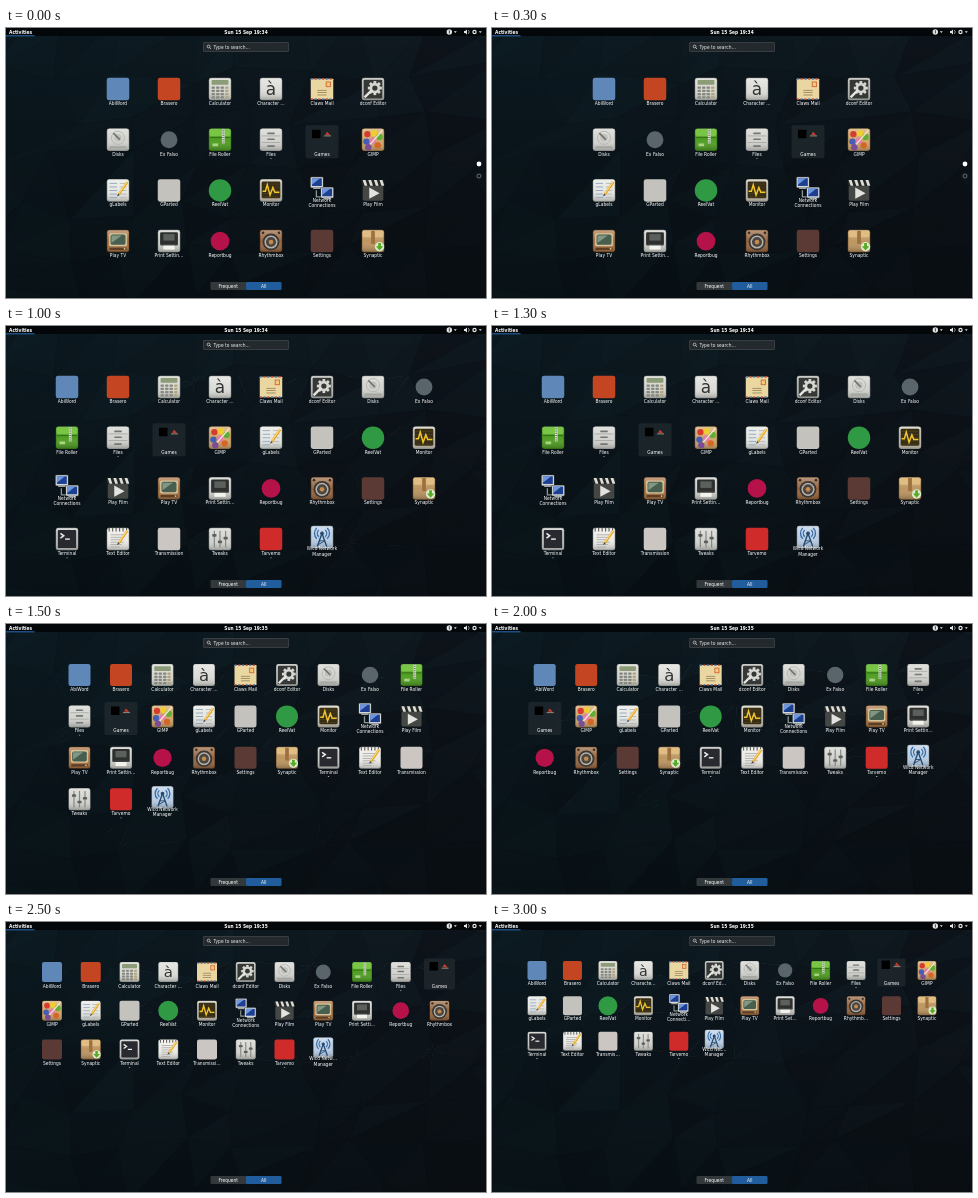
These frames come from a looping animation (480 by 270 pixels, 3.5 s). An HTML page with a canvas:

```html
<!DOCTYPE html>
<html lang="en">
<head>
<meta charset="utf-8">
<title>Application grid</title>
<style>
  html, body { margin: 0; width: 100%; height: 100%; overflow: hidden; background: #0c161b; }
  canvas { display: block; width: 480px; height: 270px; }
</style>
</head>
<body>
<canvas id="stage"></canvas>
<script>
const canvas = document.getElementById('stage');
const ctx = canvas.getContext('2d');
const ratio = window.devicePixelRatio || 1;
canvas.width = 480 * ratio;
canvas.height = 270 * ratio;

const TYPE = '"DejaVu Sans", sans-serif';
const STEP = 500;

// Grid poses: columns, first column, column pitch, first row, row pitch,
// icon size, label offset, label width limit.
const roomy = { pitchX: 51, y: 61, pitchY: 50.7, size: 22.5, label: 14.2, limit: 29.4, folder: 33 };
const medium = { pitchX: 41.5, y: 51, pitchY: 41.4, size: 22, label: 14.2, limit: 29.4, folder: 33 };
const poses = [
  { ...roomy, cols: 6, x: 112, rows: 4, pages: true },
  { ...roomy, cols: 7, x: 86.5, rows: 4, pages: true },
  { ...roomy, cols: 8, x: 61, rows: 4 },
  { ...medium, cols: 9, x: 73.5, rows: 4 },
  { ...medium, cols: 10, x: 52.7, rows: 3 },
  { cols: 11, x: 46, rows: 3, pitchX: 38.75, y: 50, pitchY: 38.7, size: 20, label: 13.8, limit: 28.1, folder: 31 },
  { cols: 12, x: 45, rows: 3, pitchX: 35.45, y: 48.4, pitchY: 35.4, size: 19, label: 12.8, limit: 24.6, folder: 28 }
];

// Drawing helpers
function box(color, x, y, w, h, r = 0) {
  ctx.fillStyle = color;
  ctx.beginPath();
  ctx.roundRect(x, y, w, h, r);
  ctx.fill();
}
function disc(color, x, y, r) {
  ctx.fillStyle = color;
  ctx.beginPath();
  ctx.arc(x, y, r, 0, 7);
  ctx.fill();
}
function ring(color, width, x, y, r, from = 0, to = 2 * Math.PI) {
  ctx.strokeStyle = color;
  ctx.lineWidth = width;
  ctx.beginPath();
  ctx.arc(x, y, r, from, to);
  ctx.stroke();
}
function trace(pts) {
  ctx.beginPath();
  for (let i = 0; i < pts.length; i += 2) ctx.lineTo(pts[i], pts[i + 1]);
}
function poly(color, ...pts) {
  ctx.fillStyle = color;
  trace(pts);
  ctx.fill();
}
function line(color, width, ...pts) {
  ctx.strokeStyle = color;
  ctx.lineWidth = width;
  trace(pts);
  ctx.stroke();
}
// Text is laid out at ten times its size so that spacing stays fractional.
function text(str, x, y, { size = 4.4, weight = '', align = 'center', color = '#fff' } = {}) {
  ctx.save();
  ctx.translate(x, y);
  ctx.scale(0.1, 0.1);
  ctx.font = `${weight} ${size * 10}px ${TYPE}`;
  ctx.textAlign = align;
  ctx.textBaseline = 'alphabetic';
  ctx.fillStyle = color;
  ctx.fillText(str, 0, 0);
  ctx.restore();
}
function elide(str, limit) {
  ctx.font = `44px ${TYPE}`;
  const fits = s => ctx.measureText(s).width <= limit * 10;
  if (fits(str)) return str;
  while (str && !fits(str + '…')) str = str.slice(0, -1);
  return str + '…';
}

// Icons live in a box from -12 to 12.
function tile(color, edge = '#8a8c88') {
  const gloss = ctx.createLinearGradient(0, -12, 0, 12);
  gloss.addColorStop(0, '#fff5');
  gloss.addColorStop(0.5, '#fff0');
  gloss.addColorStop(1, '#0004');
  box(edge, -12, -12, 24, 24, 2.5);
  box(color, -11.4, -11.6, 22.8, 22.8, 2.2);
  box(gloss, -11.4, -11.6, 22.8, 22.8, 2.2);
}
const square = color => () => box(color, -12, -12, 24, 24, 2.5);
const circle = (color, r = 12) => () => disc(color, 0, 0, r);
function pencil() {
  line('#e8a720', 2.6, 10, -9, 1, 4);
  line('#fff3c0', 0.8, 10, -9.6, 1, 3.2);
  poly('#444', 1.9, 5, 0.1, 3.4, -1, 6.4);
}
function screen(x, y) {
  box('#444a4a', x - 0.5, y - 0.5, 14, 12, 1);
  box('#d5d8d8', x, y, 13, 11, 1);
  box('#1c3f91', x + 1.2, y + 1.2, 10.6, 8.2);
  poly('#6e96dc', x + 1.2, y + 1.2, x + 10, y + 1.2, x + 1.2, y + 8);
  box('#a4a9a8', x + 2.5, y + 11, 8, 1.6);
}

const icons = {
  calculator() {
    tile('#d6d6ce');
    box('#8c9c78', -9, -9.5, 18, 5, 0.8);
    for (let i = 0; i < 16; i++)
      box(i % 4 == 3 ? '#b0a57e' : '#858880', -9 + i % 4 * 4.8, -2.6 + (i >> 2) * 3.4, 3.6, 2.4, 0.5);
  },
  characters() {
    tile('#dcddd8');
    text('à', 0, 6.5, { size: 18, color: '#333' });
  },
  mail() {
    box('#e9d6a1', -12, -11, 24, 22, 0.5);
    for (let i = 0; i < 6; i++) {
      box(i % 2 ? '#c75536' : '#557aab', -12 + i * 4, -11.5, 2.5, 1.6);
      box(i % 2 ? '#557aab' : '#c75536', -12 + i * 4, 10, 2.5, 1.6);
    }
    box('#cf6b3b', 4, -8, 5.5, 6);
    box('#f7c77b', 5, -7, 3.5, 4);
    for (let i = 0; i < 3; i++) box('#8d7953', -5, 1 + i * 2.5, 10, 0.8);
  },
  gear() {
    tile('#c6c8c2');
    box('#353836', -10, -10, 20, 20, 1);
    for (let i = 0; i < 8; i++) {
      const a = i * Math.PI / 4;
      line('#d5d6d0', 3, 2, -1, 2 + 7.5 * Math.cos(a), -1 + 7.5 * Math.sin(a));
    }
    disc('#d5d6d0', 2, -1, 5.6);
    disc('#353836', 2, -1, 2.8);
    line('#e3e4df', 2.6, -9, 9, -1, 1);
  },
  drive() {
    tile('#d2d3ce');
    ring('#b4b6b1', 1, 0, -2, 7);
    disc('#bfc1bc', 0, -2, 4);
    line('#71746f', 1.8, -5, -7, 2, 0);
    box('#a3a6a1', -9, 7, 18, 2.2, 0.8);
  },
  archive() {
    tile('#4f9e22', '#2f6913');
    box('#79c544', -11, -11, 22, 7, 1.5);
    box('#347612', -11, -3, 22, 1.4);
    box('#d4dccb', 2, -11, 3, 15);
    for (let i = 0; i < 6; i++) box('#66705c', 2.5, -10 + i * 2.4, 2, 1);
    box('#a8d480', -8, 4, 6, 3);
  },
  files() {
    tile('#d2d3ce');
    for (const y of [-4, 3]) line('#9fa19d', 0.8, -10, y, 10, y);
    box('#747773', -4, -7.6, 8, 1.8, 0.6);
    box('#747773', -4, -1.4, 8, 1.8, 0.6);
    box('#747773', -4, 6, 8, 1.8, 0.6);
  },
  palette() {
    tile('#cfa56a', '#83643b');
    [['#d63b2d', -6, -6], ['#efcc2f', 1, -7], ['#5fae3a', 7, -3], ['#455db5', -7, 2],
     ['#e47cac', 0, 1], ['#d66625', 5, 6], ['#7b4d97', -5, 8]].forEach(([c, x, y]) => disc(c, x, y, 3.4));
    line('#f4ead0', 1.4, 10, -10, -3, 5);
  },
  labels() {
    tile('#e6e6e1');
    for (let i = 0; i < 5; i++) {
      box('#90a8c4', -9, -8 + i * 3.8, 8, 1);
      box('#b8b8b5', 2, -8 + i * 3.8, 7, 1);
    }
    pencil();
  },
  monitor() {
    tile('#d0c9b8');
    box('#352d16', -10, -9.5, 20, 18, 1.5);
    for (let i = -2; i < 3; i++) line('#675623', 0.4, -9, i * 3.4, 9, i * 3.4);
    line('#f3c52c', 1.6, -9, 1, -6, 1, -4, -6, -1, 5, 2, -3, 4, 2, 9, 2);
  },
  network() {
    line('#8c9796', 1.4, -6, 2, -6, 9, 4, 9);
    screen(-12, -12);
    screen(-1, -1);
  },
  film() {
    box('#454745', -11, -5, 22, 16, 1.5);
    box('#252725', -12, -11, 24, 6, 1);
    for (let i = 0; i < 4; i++) poly('#deded8', -11 + i * 6, -11, -8 + i * 6, -11, -6 + i * 6, -5, -9 + i * 6, -5);
    poly('#e2e3df', -4, -3, 7, 3, -4, 9);
  },
  tv() {
    tile('#a97344', '#51361f');
    box('#d4c39b', -9.5, -8.5, 19, 14, 2);
    box('#485e4e', -8, -7, 16, 11, 2);
    poly('#819784', -7, -6, 4, -6, -7, 2);
    box('#5c3e25', -9, 7, 18, 2.5);
    disc('#e2c179', 7, 8.2, 1);
  },
  printer() {
    tile('#cfd0ca');
    box('#2d302f', -9.5, -9.5, 19, 14, 1.5);
    box('#5c605d', -6, -7.5, 12, 7);
    box('#f3f3ee', -6, 4, 12, 5);
    box('#3e4240', -9, 3, 18, 1.6);
  },
  speaker() {
    tile('#96663f', '#5a351b');
    disc('#3b3734', 0, 1, 9);
    disc('#b8b2a9', 0, 1, 7);
    disc('#4a4643', 0, 1, 5.4);
    disc('#c48b4a', 0, 1, 2.5);
    for (const x of [-8.5, 8.5]) disc('#3b3028', x, -8.8, 1.4);
  },
  parcel() {
    tile('#bd9560', '#795a32');
    box('#dfbd83', -11, -11, 22, 7, 1.5);
    box('#9c713f', -2, -11, 4, 14);
    disc('#dcebcf', 7, 6, 5);
    poly('#59aa24', 5.5, 2, 8.5, 2, 8.5, 5.5, 11, 5.5, 7, 10, 3, 5.5, 5.5, 5.5);
  },
  terminal() {
    tile('#c8cac7');
    box('#292a30', -9.8, -9.8, 19.6, 19.4, 1);
    line('#eee', 1.6, -7, -6, -3.5, -3.5, -7, -1);
    line('#eee', 1.5, -2, 0, 3, 0);
  },
  editor() {
    tile('#ebeae5');
    for (let i = 0; i < 6; i++) {
      box('#5d5d5b', -10 + i * 3.7, -12, 1.2, 4);
      box('#a8aaa8', -8, -5 + i * 2.6, 14 - i % 3 * 2, 0.9);
    }
    pencil();
  },
  sliders() {
    tile('#d2d3ce');
    [[-6, -4], [0, 3], [6, -1]].forEach(([x, y]) => {
      line('#858884', 1.3, x, -9, x, 9);
      box('#5d605c', x - 2.3, y - 1.4, 4.6, 2.8, 1);
    });
  },
  antenna() {
    tile('#b8cee6');
    line('#26496f', 1.5, -5, 10, 0, -4, 5, 10);
    line('#26496f', 1, -3, 4, 3, 4, -4, 8);
    disc('#26496f', 0, -4, 2);
    for (const r of [5, 8]) {
      ring('#386ca3', 1.4, 0, -4, r, -0.8, 0.8);
      ring('#386ca3', 1.4, 0, -4, r, 2.34, 3.94);
    }
  }
};

const apps = [
  ['AbiWord', square('#5f88b8')],
  ['Brasero', square('#c44522')],
  ['Calculator', icons.calculator],
  ['Character Map', icons.characters],
  ['Claws Mail', icons.mail],
  ['dconf Editor', icons.gear],
  ['Disks', icons.drive],
  ['Ex Falso', circle('#59646b', 9)],
  ['File Roller', icons.archive],
  ['Files', icons.files, true],
  ['Games', null],
  ['GIMP', icons.palette],
  ['gLabels', icons.labels],
  ['GParted', square('#c3c2bd')],
  ['ReelVat', circle('#2f9a43')],
  ['Monitor', icons.monitor],
  ['Network|Connections', icons.network],
  ['Play Film', icons.film],
  ['Play TV', icons.tv],
  ['Print Settings', icons.printer],
  ['Reportbug', circle('#b5124a', 10)],
  ['Rhythmbox', icons.speaker],
  ['Settings', square('#5b3a36')],
  ['Synaptic', icons.parcel],
  ['Terminal', icons.terminal, true],
  ['Text Editor', icons.editor],
  ['Transmission', square('#cbc6c2')],
  ['Tweaks', icons.sliders],
  ['Tarvemo', square('#cf2b2b'), true],
  ['Wicd Network|Manager', icons.antenna]
];

// Low-poly wallpaper: a jittered mesh, teal on the left and slate on the right.
function drawBackdrop() {
  const cellX = 60, cellY = 45;
  const noise = (i, j, k) => Math.abs(Math.sin(i * 12.99 + j * 78.23 + k * 37.7) * 43758.5) % 1;
  const corner = (i, j) => [
    (i + noise(i, j, 1) * 0.6 - 0.3) * cellX,
    (j + noise(i, j, 2) * 0.6 - 0.3) * cellY
  ];
  const facet = (i, j, k, ...corners) => {
    const across = Math.min(1, Math.max(0, i / 7));
    const light = noise(i, j, k) * 6 - 3;
    const color = `rgb(${12 + light * 0.4 + across * 2}, ${26 + light - across * 4}, ${33 + light - across * 4})`;
    poly(color, ...corners.flat());
    line(color, 0.6, ...corners.flat(), ...corners[0]);
  };
  for (let j = -1; j < 7; j++) {
    for (let i = -1; i < 9; i++) {
      const a = corner(i, j), b = corner(i + 1, j), c = corner(i, j + 1), d = corner(i + 1, j + 1);
      facet(i, j, 3, a, b, c);
      facet(i, j, 4, b, d, c);
    }
  }
  const shade = ctx.createLinearGradient(0, 0, 0, 270);
  shade.addColorStop(0, '#0000');
  shade.addColorStop(1, '#0005');
  box(shade, 0, 0, 480, 270);
}

function drawShell(clock) {
  box('#04070a', 0, 0, 480, 8);
  box('#2a6db5', 0, 7.3, 28.5, 1);
  text('Activities', 14.6, 5.6, { weight: 'bold' });
  text('Sun 15 Sep ' + clock, 240, 5.6, { weight: 'bold' });

  disc('#e4e4e4', 443.3, 4, 2.7);
  box('#222', 442.9, 2.2, 0.8, 3.4);
  poly('#e4e4e4', 458, 3, 459.2, 3, 461, 1.6, 461, 6.4, 459.2, 5, 458, 5);
  ring('#ccc', 0.7, 460.5, 4, 2.6, -0.9, 0.9);
  ring('#e4e4e4', 1.2, 468.5, 4, 1.6);
  for (const x of [449.3, 474.3]) poly('#ddd', x - 1.5, 3.2, x + 1.5, 3.2, x, 5);

  box('#4d5355', 197, 14, 86, 10, 2);
  box('#23292c', 197.5, 14.5, 85, 9, 1.6);
  ring('#ddd', 0.7, 202.6, 18.5, 1.4);
  line('#ddd', 0.8, 203.6, 19.5, 205, 20.9);
  text('Type to search…', 207.5, 20.6, { align: 'left', color: '#eee' });

  box('#33383a', 204.5, 254, 36, 8, 1.2);
  box('#215d9c', 240, 254, 35.5, 8, 1.2);
  text('Frequent', 222.3, 259.6);
  text('All', 257.8, 259.6);
}

function drawFolder(x, y, side) {
  box('#20282dcc', x - side / 2, y + 2 - side / 2, side, side, 2);
  box('#000', x - 10, y - 10, 8.5, 8.5, 0.5);
  poly('#c73a2c', x + 3, y - 5, x + 5, y - 8, x + 7, y - 6, x + 8, y - 4.4);
  line('#b7a48e', 0.8, x + 2, y - 3.8, x + 9, y - 3.8);
}

function drawApp([name, icon, running], x, y, pose) {
  const lines = name.split('|');
  const extra = lines.length - 1;
  const limit = pose.limit * (extra ? 1.06 : 1);
  const baseline = y + pose.label + 1.7;
  if (icon) {
    ctx.save();
    ctx.translate(x, y - extra * 2);
    ctx.scale(pose.size / 24, pose.size / 24);
    icon();
    ctx.restore();
  } else {
    drawFolder(x, y, pose.folder);
  }
  lines.forEach((str, i) => text(elide(str, limit), x, baseline + extra * 0.6 - (extra - i) * 5.2));
  if (running) box('#aab2b6', x - 0.8, baseline + 2.4, 1.6, 0.8, 0.4);
}

function draw(now) {
  const index = Math.floor(now / STEP) % poses.length;
  const pose = poses[index];
  ctx.setTransform(ratio, 0, 0, ratio, 0, 0);
  drawBackdrop();
  drawShell(index < 3 ? '19:34' : '19:35');
  apps.slice(0, pose.cols * pose.rows).forEach((app, i) => {
    const row = Math.floor(i / pose.cols);
    drawApp(app, pose.x + i % pose.cols * pose.pitchX, pose.y + row * pose.pitchY, pose);
  });
  if (pose.pages) {
    disc('#fff', 473, 136, 2.4);
    ring('#8b9296', 0.7, 473, 148, 2);
  }
  requestAnimationFrame(draw);
}
requestAnimationFrame(draw);
</script>
</body>
</html>
```
